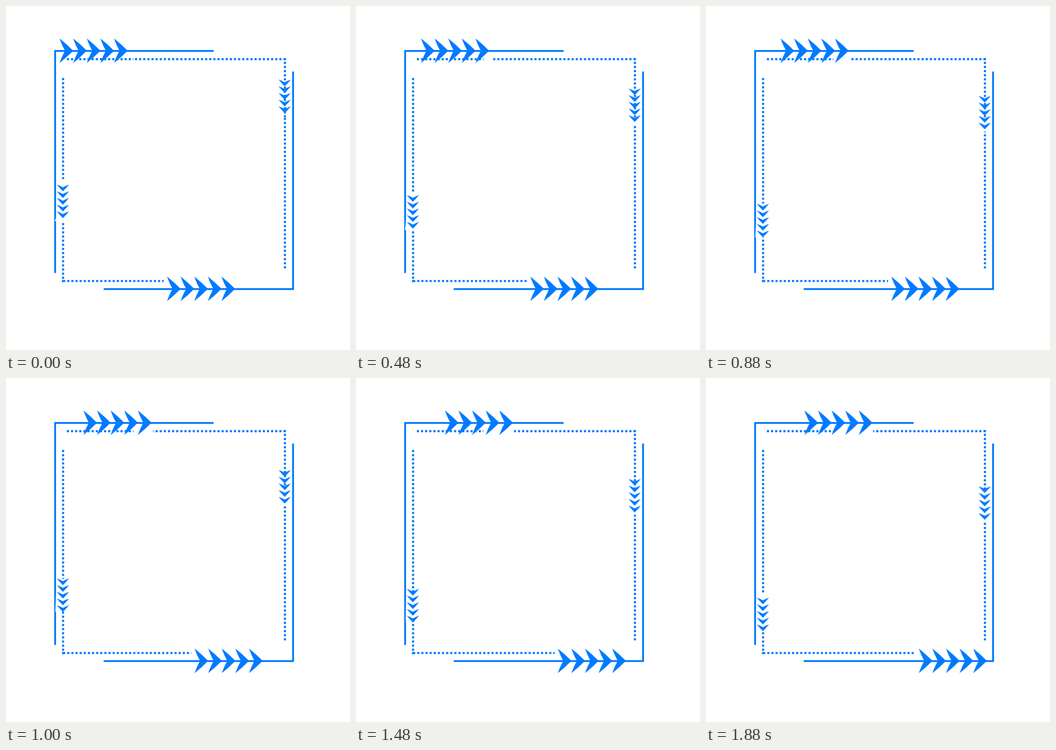
An HTML page for the animation above (1.92 s loop, 748x748 px).

```html
<!DOCTYPE html>
<html lang="en">
<head>
<meta charset="utf-8">
<title>Arrow frame</title>
<style>
  html, body { margin: 0; width: 100%; height: 100%; overflow: hidden; background: #fff; }
  svg { display: block; width: 100vw; height: 100vh; }
  .line, .dash { fill: none; stroke: #007aff; }
  .line { stroke-width: 4; }
  .dash { stroke-width: 4.6; stroke-dasharray: 4.6 4.37; }
  .row { fill: #007aff; }

  /* 48 even steps of 40 ms; each part sets its own end pose */
  .move { animation: move 1920ms steps(48) infinite; }
  @keyframes move { to { transform: var(--to); } }

  .wedge { fill: #fff; transform-origin: 109.2px 461px; --to: scale(.09, 13.3); }
</style>
</head>
<body>
<svg viewBox="0 0 748 748">
  <defs>
    <path id="arrow" d="M0-26.8Q16-14 29.6 0Q16 14 0 26.8Q5 12 12 0Q5-12 0-26.8Z"/>
    <g id="row">
      <use href="#arrow"/>
      <use href="#arrow" x="29.6"/>
      <use href="#arrow" x="59.2"/>
      <use href="#arrow" x="88.8"/>
      <use href="#arrow" x="118.4"/>
    </g>

    <!-- windows that reveal or hide the dashes -->
    <clipPath id="topWin"><rect class="move" style="--to:translate(95.2px,0)" x="270.2" y="100" width="400" height="30"/></clipPath>
    <clipPath id="rightWin"><rect class="move" style="--to:translate(0,77.2px)" x="590" y="237.7" width="30" height="400"/></clipPath>
    <clipPath id="bottomWin"><rect class="move" style="--to:translate(114.8px,0)" x="-57" y="580" width="400" height="30"/></clipPath>
    <clipPath id="leftWin"><rect class="move" style="--to:translate(0,114.8px)" x="110" y="-23" width="30" height="400"/></clipPath>
    <clipPath id="cornerWin"><rect class="move" style="--to:translate(0,77.8px)" x="110" y="467" width="30" height="200"/></clipPath>
  </defs>

  <path class="line" d="M451.5 97.8H106.8V580.5M212.5 615.6H624.2V142.5"/>
  <path class="wedge move" d="M109.2 461V467.4H105.6Z"/>

  <path class="dash" d="M132.4 115.6H277"/>
  <g clip-path="url(#topWin)"><path class="dash" d="M280.4 115.6H608.8"/></g>
  <path class="dash" stroke-dashoffset=".9" d="M606.5 113.3V242"/>
  <g clip-path="url(#rightWin)"><path class="dash" d="M606.5 234.1V570.6"/></g>
  <g clip-path="url(#leftWin)"><path class="dash" d="M124.1 156.6V467"/></g>
  <g clip-path="url(#cornerWin)"><path class="dash" d="M124.1 472V600.3"/></g>
  <path class="dash" d="M121.8 598H124.4"/>
  <g clip-path="url(#bottomWin)"><path class="dash" d="M124.2 598H500"/></g>

  <g class="row">
    <g class="move" style="--to:translate(99.6px,0)"><use href="#row" transform="translate(116.5 97.3)"/></g>
    <g class="move" style="--to:translate(114.9px,0)"><use href="#row" transform="translate(350.2 615)"/></g>
    <g class="move" style="--to:translate(0,91.1px)"><use href="#row" transform="translate(123.7 388.4) rotate(90) scale(.492)"/></g>
    <g class="move" style="--to:translate(0,77.1px)"><use href="#row" transform="translate(606 160) rotate(90) scale(.492)"/></g>
  </g>
</svg>
</body>
</html>
```
